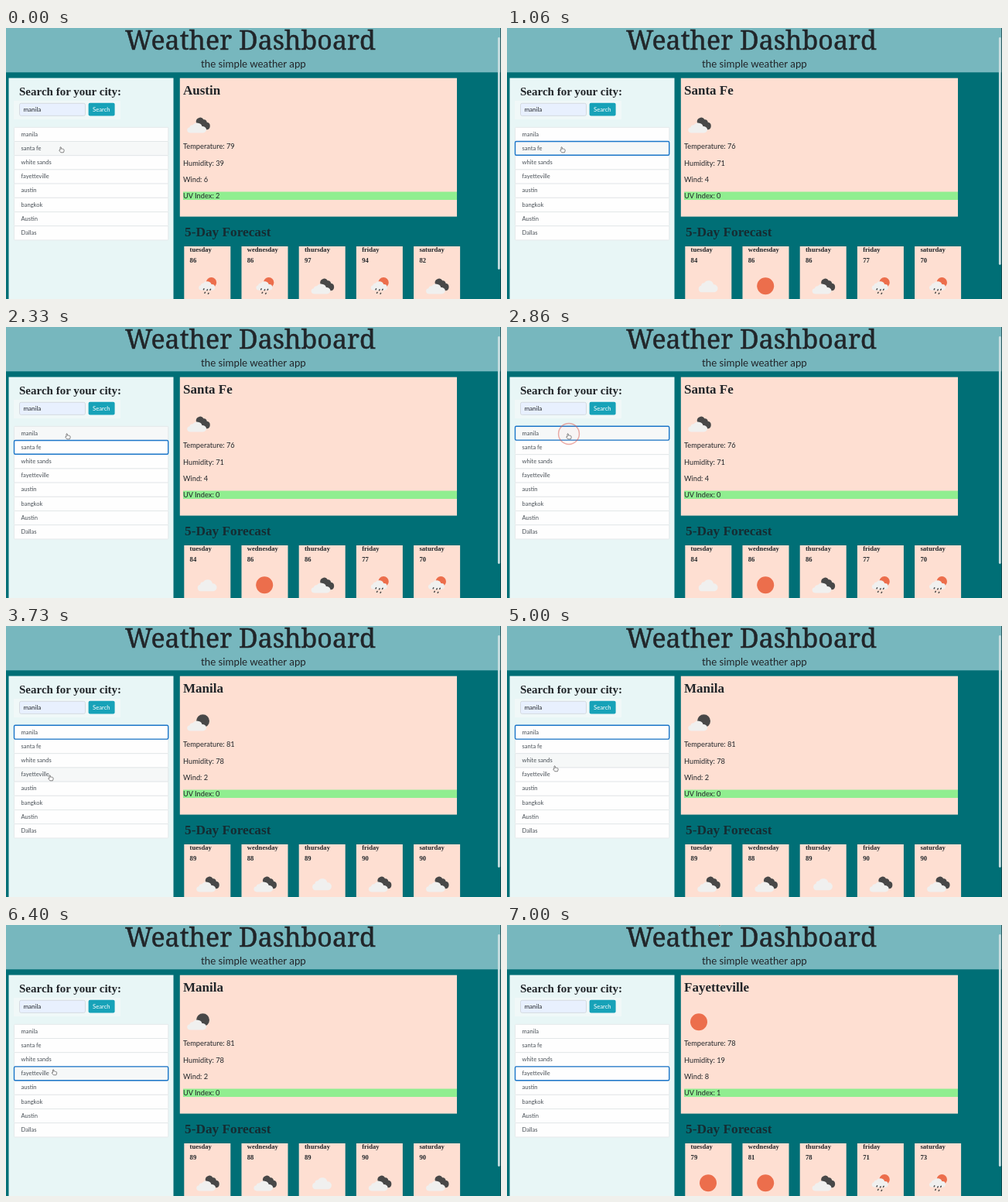
Animation, 640 px wide and 350 px high, one loop 7530 ms. Source, as an HTML page:

```html
<!DOCTYPE html>
<html lang="en">
<head>
<meta charset="utf-8">
<title>Weather Dashboard</title>
<style>
  html, body { margin: 0; width: 100%; height: 100%; overflow: hidden; background: #006f76; }
  svg { display: block; width: 100vw; height: 100vh; }
  text { font-family: Lato, "Open Sans", sans-serif; fill: #212529; white-space: pre; }
  .title { font-family: "Noto Serif", serif; stroke: #212529; stroke-width: .5; }
  .serif { font-family: "Liberation Serif", "Noto Serif", serif; font-weight: bold; }
  .list { font-size: 7.55px; fill: #495057; }
  .stat { font-size: 9.25px; }
  .day { font-size: 8.6px; }
</style>
</head>
<body>
<svg viewBox="0 0 640 350" xmlns="http://www.w3.org/2000/svg">
  <defs>
    <path id="puff" d="M4.5 17A4.4 4.4 0 0 1 4 8.4A4 4 0 0 1 8 5A6.6 6.6 0 0 1 20 7A5 5 0 0 1 21 17Z"/>
    <use id="low" href="#puff" transform="translate(-14.5 -4.3) scale(1 .85)" fill="#f0f0ef"/>
    <g id="sun"><circle r="11" fill="#ec6e4c"/></g>
    <g id="cloud"><use href="#puff" x="-13" y="-9" fill="#f0f0ef"/></g>
    <g id="broken">
      <path d="M-2 -3A5.2 5.2 0 0 1 7.5 -7Q11 -7.5 11.8 -3.5A4.8 4.8 0 0 1 11.5 6H4Z" fill="#484848"/>
      <use href="#low"/>
    </g>
    <g id="night">
      <circle cx="6.5" cy="-2.5" r="8.5" fill="#484848"/>
      <use href="#low"/>
    </g>
    <g id="rain">
      <circle cx="5.5" cy="-4.5" r="6.7" fill="#ec6e4c"/>
      <use href="#puff" transform="translate(-11.5 -7.5) scale(.85 .76)" fill="#f0f0ef"/>
      <path d="M-4 3.5l-.6 1M.5 4.5l-.6 1M4.5 4l-.6 1M-2.5 8l-.6 1M2 9l-.6 1" stroke="#484848" stroke-width="1.5" stroke-linecap="round"/>
    </g>
  </defs>

  <rect width="640" height="350" fill="#006f76"/>
  <rect width="640" height="57.3" fill="#77b7be"/>
  <text class="title" x="154" y="28.3" font-size="33.9">Weather Dashboard</text>
  <text x="252" y="50.7" font-size="13.3">the simple weather app</text>

  <rect x="3.5" y="64.6" width="213" height="286" fill="#e8f6f6"/>
  <text class="serif" x="17" y="87" font-size="15">Search for your city:</text>
  <rect x="10" y="94" width="138" height="24" fill="#f0f8f8"/>
  <rect x="17.5" y="97.3" width="85" height="16" rx="2" fill="#e8f0fe" stroke="#ced4da" stroke-width=".8"/>
  <text x="22.5" y="108" font-size="8">manila</text>
  <rect x="106.6" y="96.8" width="34" height="16.8" rx="2" fill="#17a2b8"/>
  <text x="112" y="107.8" font-size="7.7" style="fill:#fff">Search</text>
  <g id="rows"></g>
  <rect id="focus" x="10.5" width="199.2" height="17.8" rx="1.5" fill="none" stroke="#1b76c9" stroke-width="1.4"/>

  <rect x="224.8" y="64.7" width="358.2" height="178.9" fill="#fedfd2"/>
  <rect x="229" y="211.5" width="354" height="10.5" fill="#90ee90"/>
  <text class="serif" x="231" y="268.5" font-size="17.3" style="fill:#152c32">5-Day Forecast</text>
  <g id="report"></g>

  <rect id="thumb" x="635.9" y="12" width="2.8" rx="1.4" fill="#c9dfe1"/>
  <rect x="639.3" width=".7" height="350" fill="#10383d"/>

  <circle id="ring" stroke="#dc5a50" stroke-width="1.4" fill="#ffb4aa" fill-opacity=".12"/>
  <path id="hand" d="M-2.2 .8V-3.2Q-1.5 -4.3 -.8 -3.2V-1Q.2 -1.7 .8 -.8Q1.7 -1.3 2.2 -.4Q3.4 -.6 3.4 .6V2.2L2.6 4.2H-1.3L-3.7 1.2Q-3.6 .1 -2.2 .8Z" fill="#fff" stroke="#555" stroke-width=".8"/>
  <path id="arrow" d="M-3 -5V4L-1 2.3L.6 5.5L2 4.8L.5 1.8H3Z" fill="#111" stroke="#fff" stroke-width=".6"/>
</svg>
<script>
const LOOP = 7530, ROW_TOP = 128.3, ROW_H = 18.2;
const cities = ["manila", "santa fe", "white sands", "fayetteville", "austin", "bangkok", "Austin", "Dallas"];
const days = ["tuesday", "wednesday", "thursday", "friday", "saturday"];
const reports = [
  { at: 0, city: "Austin", icon: "broken", stats: [79, 39, 6, 2], thumb: 300,
    temps: [86, 86, 97, 94, 82], icons: ["rain", "rain", "broken", "rain", "broken"] },
  { at: 800, city: "Santa Fe", icon: "broken", stats: [76, 71, 4, 0], thumb: 294,
    temps: [84, 86, 86, 77, 70], icons: ["cloud", "sun", "broken", "rain", "rain"] },
  { at: 3400, city: "Manila", icon: "night", stats: [81, 78, 2, 0], thumb: 300,
    temps: [89, 88, 89, 90, 90], icons: ["broken", "broken", "cloud", "broken", "broken"] },
  { at: 6860, city: "Fayetteville", icon: "sun", stats: [78, 19, 8, 1], thumb: 300,
    temps: [79, 81, 78, 71, 73], icons: ["sun", "sun", "broken", "rain", "rain"] }
];
const clicks = [{ at: 60, row: 1 }, { at: 2660, row: 0 }, { at: 5330, row: 3 }];
// pointer path: time, x, y
const path = [
  [0, 72, 156.5], [1600, 72, 156.5], [2330, 80, 140.5], [3400, 80, 140.5], [3730, 58, 195.5],
  [4000, 59, 196.5], [4530, 59, 196.5], [5000, 63, 183.5], [5200, 62.5, 189.5],
  [6400, 62.5, 189.5], [6530, 274, -4], [LOOP, 274, -4]
];

const $ = id => document.getElementById(id);
const set = (el, attrs) => { for (const k in attrs) el.setAttribute(k, attrs[k]); };
const show = (el, on) => el.style.display = on ? "" : "none";
const text = (cls, x, y, s, size = "") =>
  `<text class="${cls}" x="${x}" y="${y}"${size && ` font-size="${size}"`}>${s}</text>`;
const icon = (name, x, y) => `<use href="#${name}" x="${x}" y="${y}"/>`;
const latest = (list, t) => list.filter(e => e.at <= t).pop();

$("rows").innerHTML = cities.map((c, i) => {
  const y = ROW_TOP + i * ROW_H;
  return `<rect x="10.5" y="${y}" width="199.3" height="${ROW_H}" rx="1" stroke="#e0e5e6" stroke-width=".8"/>` +
    text("list", 19.5, y + 11.3, c);
}).join("");
const rowRects = [...$("rows").querySelectorAll("rect")];

function reportMarkup(r) {
  const labels = ["Temperature", "Humidity", "Wind", "UV Index"];
  return text("serif", 229, 85.7, r.city, 17) + icon(r.icon, 248, 125.3) +
    labels.map((l, i) => text("stat", 229, 156.2 + i * 21.3, `${l}: ${r.stats[i]}`)).join("") +
    days.map((d, i) => {
      const x = 230.3 + i * 74.2;
      return `<rect x="${x}" y="282" width="60" height="68" fill="#fedfd2"/>` +
        text("serif day", x + 7.3, 288.8, d) + text("serif day", x + 7.3, 303.3, r.temps[i]) +
        icon(r.icons[i], x + 29.7, 333.3);
    }).join("");
}

function pointer(t) {
  const i = path.findIndex(p => p[0] > t);
  const [t0, x0, y0] = path[i - 1], [t1, x1, y1] = path[i];
  const u = (t - t0) / (t1 - t0), e = u * u * (3 - 2 * u);
  return [x0 + (x1 - x0) * e, y0 + (y1 - y0) * e];
}

let shown;
function draw(t) {
  const report = latest(reports, t);
  if (report !== shown) {
    shown = report;
    $("report").innerHTML = reportMarkup(report);
    set($("thumb"), { height: report.thumb });
  }

  const [x, y] = pointer(t);
  const hover = x < 210 ? Math.floor((y - 3 - ROW_TOP) / ROW_H) : -1;
  const onList = hover >= 0 && hover < cities.length;
  rowRects.forEach((r, i) => set(r, { fill: i === hover ? "#f6f8f8" : "#fefefe" }));
  set($("hand"), { transform: `translate(${x} ${y + .5}) scale(.9)` });
  set($("arrow"), { transform: `translate(${x} ${y})` });
  show($("hand"), onList);
  show($("arrow"), !onList);

  const click = latest(clicks, t);
  show($("focus"), click);
  if (click) set($("focus"), { y: ROW_TOP + click.row * ROW_H });
  const age = click ? (t - click.at) / 270 : 1;
  show($("ring"), age < 1);
  if (age < 1) set($("ring"), { cx: x, cy: y - 2.5, r: 9 + 6 * age, opacity: Math.min(1, 2 * (1 - age)) });
}

const start = performance.now();
function frame() {
  draw((performance.now() - start) % LOOP);
  requestAnimationFrame(frame);
}
frame();
</script>
</body>
</html>
```
